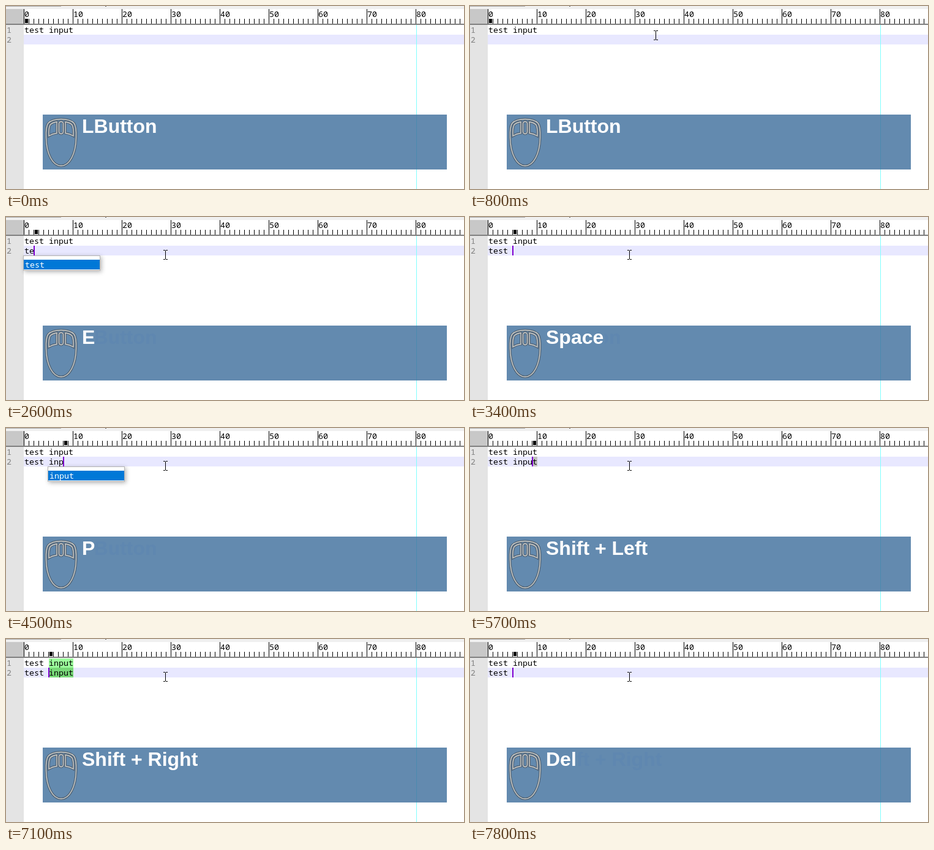
Animation, 748 px wide and 300 px high, one loop 8000 ms. Source, as an HTML page with a canvas:

```html
<!DOCTYPE html>
<html lang="en">
<head>
<meta charset="utf-8">
<title>Typing with key display</title>
<style>
html, body { margin: 0; width: 100%; height: 100%; overflow: hidden; background: #fff; }
canvas { display: block; }
</style>
</head>
<body>
<canvas id="stage" width="748" height="300"></canvas>
<script>
const c = document.getElementById('stage').getContext('2d', { alpha: false });
const LOOP = 8000, LEFT = 30, CELL = 8, BLINK = 530;
const MONO = '13.333px "Noto Sans Mono", monospace';
const KEY = 'bold 32px "Liberation Sans", Arial, sans-serif';
const BAR = [100, 138, 175], GHOST = [95, 135, 176], WHITE = [255, 255, 255];

// time, key label, second line, caret column, start and end of the label's fade
const keys = [
  [-980, 'LButton', '', 0, 1200, 1600],
  [2400, 'T', 't', 1],
  [2600, 'E', 'te', 2],
  [2800, 'S', 'tes', 3],
  [3000, 'T', 'test', 4],
  [3200, 'Space', 'test ', 5],
  [3900, 'I', 'test i', 6],
  [4200, 'N', 'test in', 7],
  [4500, 'P', 'test inp', 8],
  [4800, 'U', 'test inpu', 9],
  [5100, 'T', 'test input', 10],
  [5700, 'Shift + Left', 'test input', 9],
  [5950, 'Shift + Left', 'test input', 8],
  [6200, 'Shift + Left', 'test input', 7],
  [6350, 'Shift + Left', 'test input', 6],
  [6500, 'Shift + Left', 'test input', 5],
  [6700, 'Shift + Left', 'test input', 4],
  [6970, 'Shift + Right', 'test input', 5, 7200, 7500],
  [7800, 'Del', 'test ', 5]
].map(([at, label, text, col, fadeFrom, fadeTo]) => ({ at, label, text, col, fadeFrom, fadeTo }));

const clamp = v => Math.max(0, Math.min(1, v));
const colX = n => LEFT + n * CELL;

function box(x, y, w, h, fill) {
  c.fillStyle = fill;
  c.fillRect(x, y, w, h);
}

function text(s, x, y, fill, font = MONO) {
  c.font = font;
  c.fillStyle = fill;
  c.fillText(s, x, y);
}

function ruler(col) {
  box(0, 0, 748, 5, '#f0f0f0');
  box(0, 0, 90, 1, '#a8a8a8');
  box(162, 0, 2, 1, '#606060');
  box(0, 5, 29, 25, '#c8c8c8');
  box(29, 5, 719, 25, '#fff');
  for (let n = 0; colX(n) < 748; n++) {
    const major = n % 10 === 0;
    box(colX(n) - 1, major ? 5 : 21, 1, major ? 24 : 8, '#000');
    if (major) text(String(n), colX(n), 18, '#000');
  }
  box(colX(col) + 1, 21, 5, 7, '#000');
  box(0, 29, 748, 2, '#808080');
}

function popup(word, col) {
  const x = colX(col) - 2;
  c.save();
  c.shadowColor = 'rgba(0,0,0,.3)';
  c.shadowBlur = 7;
  c.shadowOffsetX = c.shadowOffsetY = 2;
  box(x, 63, 126, 25, '#b4b4b4');
  c.restore();
  box(x + 1, 64, 124, 23, '#fff');
  box(x + 1, 70, 124, 16, '#0078d7');
  text(word, x + 3, 83, '#fff');
}

function editor(key, t) {
  const { col, text: line } = key;
  const selecting = key.label.startsWith('Shift');
  const wholeWord = selecting && col === 5;

  box(0, 31, 29, 269, '#e4e4e4');
  box(29, 47, 719, 16, '#e8e8ff');
  box(670, 31, 1, 269, '#80ffff');
  if (wholeWord) box(colX(5), 32, 40, 15, '#9cff9c');
  if (selecting) box(colX(col), 47, (10 - col) * CELL, 16, wholeWord ? '#78d878' : '#c0c0c0');

  text('1', 1, 44, '#808080');
  text('2', 1, 60, '#808080');
  text('test input', LEFT, 44, '#000');
  text(line, LEFT, 60, '#000');

  const word = line.slice(line.lastIndexOf(' ') + 1);
  const match = ['test', 'input'].find(w => w.startsWith(word));
  if (word.length > 1 && word !== match) popup(match, line.length - word.length);
  if ((t - key.at) % (2 * BLINK) < BLINK) box(colX(col) - 1, 47, 2, 16, '#8000d0');
}

const body = new Path2D('M65.5 216C65 204 66 196 69 192C74 187 82 185.5 90 185.5S106 187 111 192C114 196 115 204 114.5 216C114 242 104 262 90 262S66 242 65.5 216Z');
const left = 'M70 213C69.500 205 70 199 72 195C75 191.500 79 190.500 83 190V208.500C78 209 74 210.500 70 213Z';
const button = new Path2D(left);
const wheel = new Path2D();
wheel.roundRect(86.5, 189.5, 7, 20, 3.5);

function mouseIcon() {
  const lines = (width, color) => {
    c.lineWidth = width;
    c.strokeStyle = color;
    for (const p of [body, button, wheel]) c.stroke(p);
    c.save();
    c.translate(180, 0);
    c.scale(-1, 1);
    c.stroke(button);
    c.restore();
  };
  lines(4, 'rgba(75,82,90,.65)');
  lines(1.4, '#d0d0cc');
}

function keyBar(key, t) {
  box(60, 178, 660, 90, 'rgba(61,109,155,.8)');
  mouseIcon();
  c.font = KEY;
  const end = 125 + c.measureText(key.label).width;
  const past = keys.filter(k => k.at < key.at && k.fadeTo).pop();
  if (past) {
    c.save();
    c.beginPath();
    c.rect(end, 178, 720 - end, 90);
    c.clip();
    text(past.label, 124, 208, `rgb(${GHOST})`, KEY);
    c.restore();
  }
  const fade = key.fadeTo ? clamp((t - key.fadeFrom) / (key.fadeTo - key.fadeFrom)) : 0;
  const color = WHITE.map((v, i) => Math.round(v + (GHOST[i] - v) * fade));
  text(key.label, 124, 208, `rgb(${color})`, KEY);
}

function pointer(t) {
  if (t < 100) return;
  const e = 1 - (1 - clamp((t - 100) / 1000)) ** 2;
  const x = Math.round(744 - 484 * e);
  const y = Math.round(205 * (1 - e) ** 2 - 60 * e * (1 - e) + 62 * e * e);
  box(x, y - 7, 1, 14, '#000');
  for (const dy of [-8, 7]) {
    box(x - 3, y + dy, 3, 1, '#000');
    box(x + 1, y + dy, 3, 1, '#000');
  }
}

function draw() {
  const t = performance.now() % LOOP;
  const key = keys.filter(k => k.at <= t).pop();
  box(0, 0, 748, 300, '#fff');
  ruler(key.col);
  editor(key, t);
  keyBar(key, t);
  pointer(t);
  requestAnimationFrame(draw);
}
draw();
</script>
</body>
</html>
```
